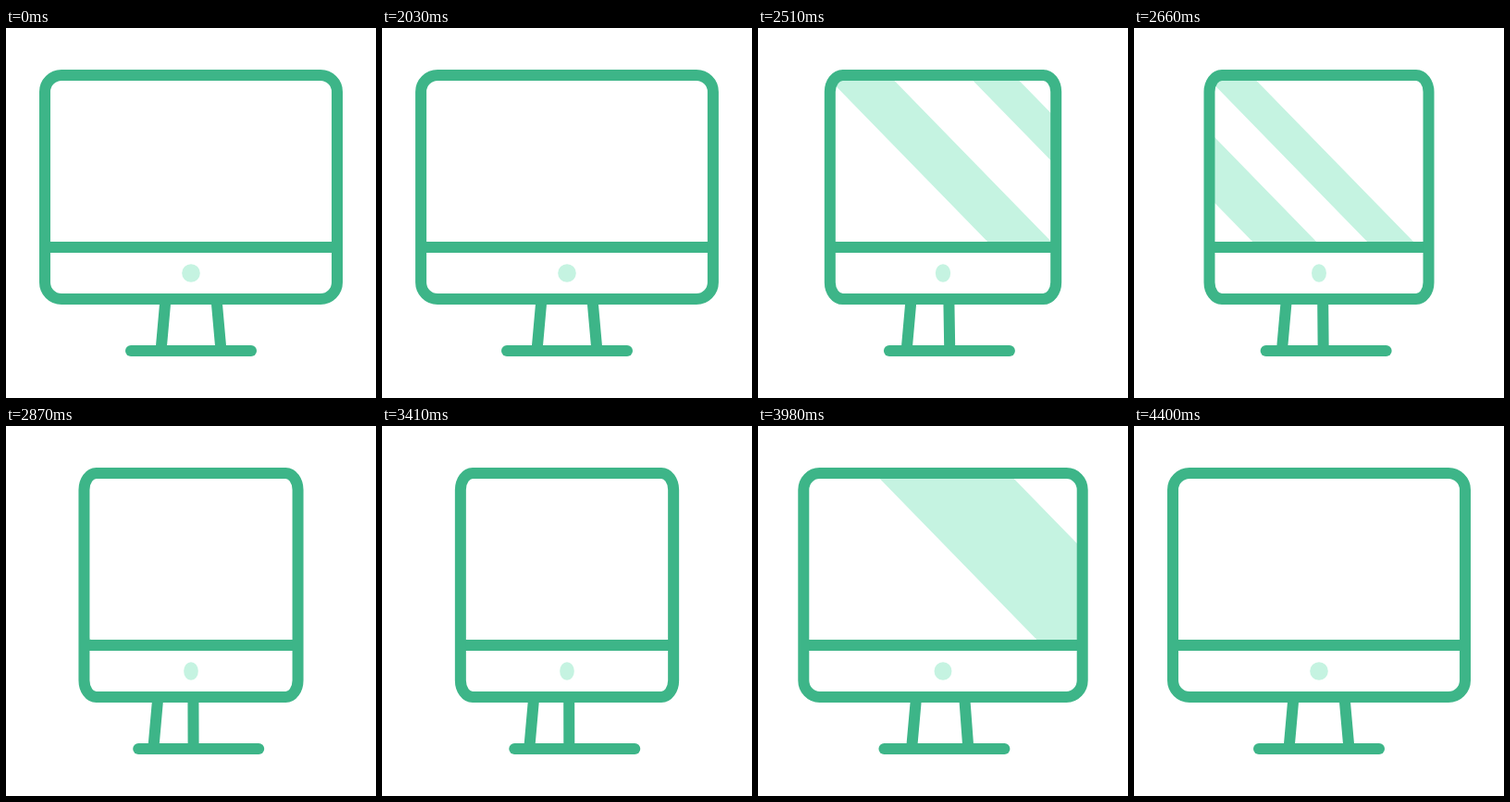
An HTML page that plays this animation: 400x400 px, repeating every 4.43 s.

```html
<!DOCTYPE html>
<html lang="en">
<head>
<meta charset="utf-8">
<title>Turning monitor</title>
<style>
  html, body { margin: 0; width: 100%; height: 100%; overflow: hidden; background: #fff; }
  svg { display: block; width: 100%; height: 100%; }
  .line { fill: none; stroke: #3db588; stroke-width: 12; }
  .light { fill: #c5f3e1; }
</style>
</head>
<body>
<svg viewBox="0 0 400 400">
  <clipPath id="screen"><rect class="body" y="51" height="242" ry="18"/></clipPath>
  <g class="line">
    <path id="legs"/>
    <path id="base" stroke-linecap="round" d="M135 349H265"/>
  </g>
  <g class="light" clip-path="url(#screen)"><path id="glare"/></g>
  <ellipse id="button" class="light" cx="200" cy="265" ry="9.8"/>
  <g class="line">
    <path id="bar"/>
    <rect class="body" y="51" height="242" ry="18"/>
  </g>
</svg>
<script>
const LOOP = 4430, STEP = 30;
const $ = id => document.getElementById(id);
const bodies = document.querySelectorAll('.body');

function set(el, attrs) {
  for (const key in attrs) el.setAttribute(key, attrs[key]);
}

// Cubic bezier easing with flat ends: control points (x1, 0) and (x2, 1)
function ease(x, x1, x2) {
  if (x <= 0) return 0;
  if (x >= 1) return 1;
  let lo = 0, hi = 1, u;
  for (let i = 0; i < 30; i++) {
    u = (lo + hi) / 2;
    const v = 1 - u;
    if (3 * x1 * u * v * v + 3 * x2 * u * u * v + u * u * u < x) lo = u; else hi = u;
  }
  return u * u * (3 - 2 * u);
}

// Diagonal band whose left edge crosses the screen top at x
function band(x, width) {
  const slope = 0.975, top = 57, bottom = 237;
  const shift = slope * (bottom - top);
  return `M${x} ${top}h${width}l${shift} ${bottom - top}h${-width}z`;
}

function draw(t) {
  const turn = ease((t - 2015) / 1215, 0.167, 0) - ease((t - 3230) / 1200, 0.6, 0.3);
  const half = 158 - 44 * turn;
  const scale = half / 158;
  const slide = 8.5 * turn;

  for (const el of bodies) set(el, { x: 200 - half, width: 2 * half, rx: 18 * scale });
  set($('bar'), { d: `M${200 - half} 237H${200 + half}` });
  set($('button'), { rx: 9.8 - 7.3 * (1 - scale) });
  set($('base'), { transform: `translate(${slide})` });
  set($('legs'), {
    d: `M${172.5 - slide} 293L${167.5 - slide} 349M${227.5 - 26 * turn} 293L${232.5 - 31 * turn} 349`
  });
  set($('glare'), {
    d: band(78.5 - 0.8 * (t - 2510), 69) +
       band(232.5 - (t - 2510), 50) +
       band(-51 + 0.87 * (t - 3770), 145)
  });
}

function frame() {
  const t = performance.now() % LOOP;
  draw(20 + Math.floor((t - 20) / STEP) * STEP);
  requestAnimationFrame(frame);
}
frame();
</script>
</body>
</html>
```
